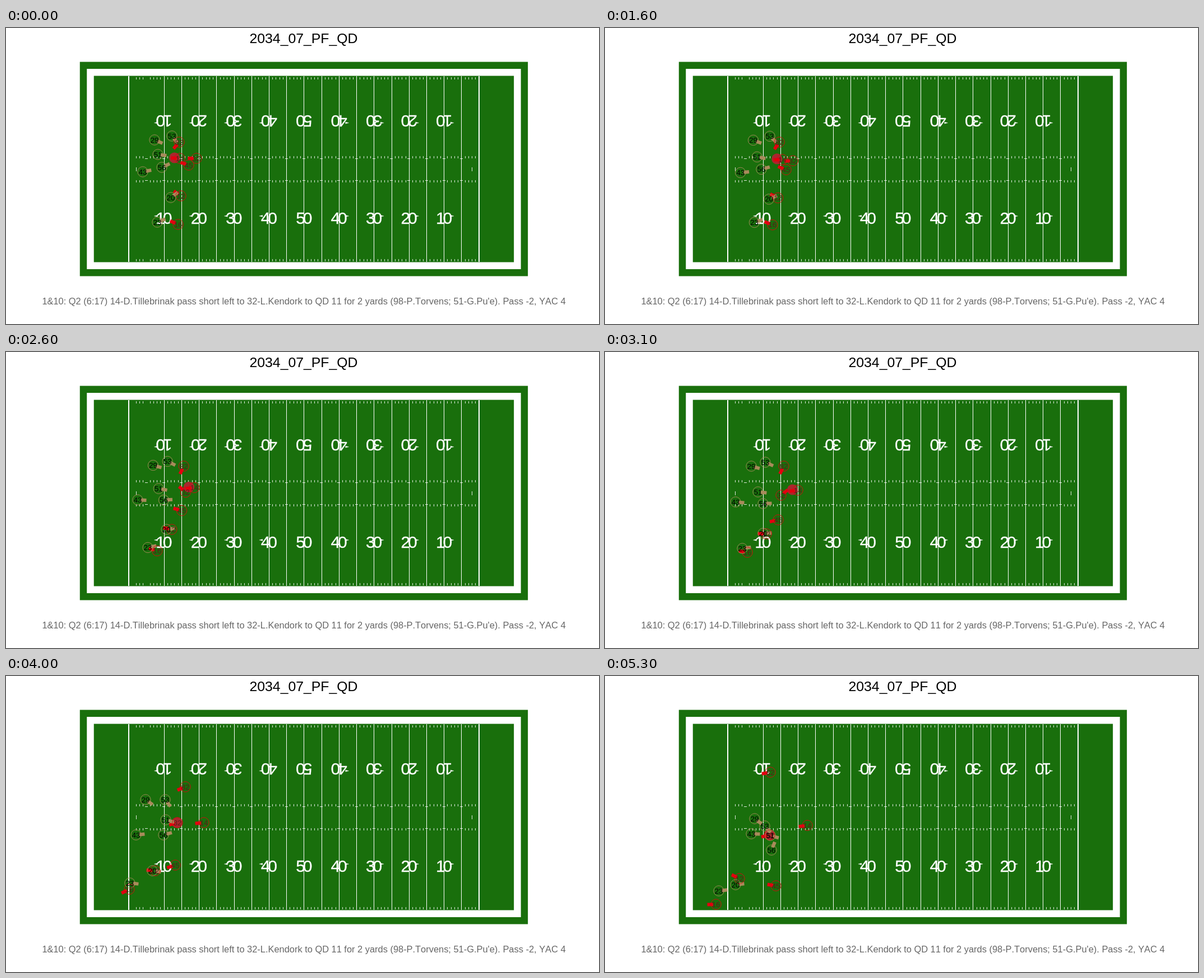
Recreate the animation shown at these times as an HTML page. Size 1058x529 px, loop 5.4 s.

```html
<!DOCTYPE html>
<html lang="en">
<head>
<meta charset="utf-8">
<title>Play animation</title>
<style>
  html, body { margin: 0; width: 100%; height: 100%; overflow: hidden; background: #fff; }
  svg { display: block; width: 100%; height: 100%; }
  text { font-family: "Liberation Sans", Arial, sans-serif; text-anchor: middle; font-kerning: none; }
</style>
</head>
<body>
<svg id="stage" viewBox="0 0 1058 529"></svg>
<script>
const LOOP = 5400, STEP = 100;
const SNAP = 900, THROW = 3500, CATCH = 3900;
const GRASS = '#196f0c', GOLD = '#a98b5b', RED = '#e3000f', BALL = '#a9272d';
const YARD = 6.245, GOAL = 219.2, MID_Y = 252, HALF_WIDTH = 166.5;
const stage = document.getElementById('stage');

function add(parent, tag, attrs, text) {
  const el = document.createElementNS('http://www.w3.org/2000/svg', tag);
  for (const k in attrs) el.setAttribute(k, attrs[k]);
  if (text !== undefined) el.textContent = text;
  parent.appendChild(el);
  return el;
}
const group = (attrs = {}) => add(stage, 'g', attrs);
const yardX = yards => GOAL + yards * YARD;

// Grass apron, white border and playing surface, two yards apart
function drawTurf() {
  [4, 2, 0].forEach((pad, i) => add(stage, 'rect', {
    x: yardX(-10 - pad), y: MID_Y - HALF_WIDTH - pad * YARD,
    width: (120 + 2 * pad) * YARD, height: 2 * (HALF_WIDTH + pad * YARD),
    fill: i === 1 ? '#fff' : GRASS
  }));
}

function drawLines() {
  const chalk = group({ stroke: '#fff', fill: 'none', 'shape-rendering': 'crispEdges' });
  const vertical = (x, top, bottom) => `M${Math.round(x) + 0.5} ${top}V${bottom}`;
  let lines = '', ticks = '';
  for (let y = 2; y < 100; y++) {
    const x = yardX(y);
    if (y % 5) {
      for (const top of [88, 229, 272, 413]) ticks += vertical(x, top, top + 4);
    } else {
      if (y > 5) lines += vertical(x, 86, 418);
      for (const row of [233.5, 272.5]) ticks += `M${x - 2.5} ${row}h5`;
    }
  }
  for (const y of [2, 98]) ticks += vertical(yardX(y), 249, 256);
  add(chalk, 'path', { d: lines });
  add(chalk, 'path', { d: ticks, 'stroke-opacity': 0.85 });
  for (const y of [0, 100])
    add(chalk, 'path', { d: `M${Math.round(yardX(y))} 86V418`, 'stroke-width': 2 });
}

function drawNumerals() {
  const marks = group({ fill: '#fff', stroke: '#fff', 'stroke-width': 0.3, 'font-size': 30 });
  for (let y = 10; y <= 90; y += 10) {
    const x = yardX(y) + 0.3, label = String(Math.min(y, 100 - y));
    for (const [cy, turn] of [[339.5, 0], [166.5, 180]]) {
      const pair = add(marks, 'g', { transform: `translate(${x} ${cy}) rotate(${turn})` });
      [...label].forEach((digit, i) => add(pair, 'text', { x: (i * 2 - 1) * YARD, y: 10.8 }, digit));
      if (y === 50) continue;
      const side = y < 50 ? -1 : 1, ay = cy > MID_Y ? 336 : 169.5;
      add(marks, 'path', { d: `M${x + side * 17.5} ${ay}l${-side * 6} -1.6v3.2z` });
    }
  }
}

// Rest until the snap, then a monotone cubic through four values
const KEYS = [SNAP, 3100, 4000, 5300];
function curve(values) {
  const slope = i => (values[i + 1] - values[i]) / (KEYS[i + 1] - KEYS[i]);
  const tangent = i => {
    if (i === 0) return 0;
    if (i === 3) return slope(2);
    const a = slope(i - 1), b = slope(i);
    return a * b > 0 ? 2 * a * b / (a + b) : 0;
  };
  return time => {
    const t = Math.min(Math.max(time, SNAP), KEYS[3]);
    const i = t < KEYS[1] ? 0 : t < KEYS[2] ? 1 : 2;
    const h = KEYS[i + 1] - KEYS[i], u = (t - KEYS[i]) / h, v = 1 - u;
    return values[i] * (1 + 2 * u) * v * v + tangent(i) * h * u * v * v
      + values[i + 1] * u * u * (3 - 2 * u) - tangent(i + 1) * h * u * u * v;
  };
}

drawTurf();
drawLines();
drawNumerals();
const ball = add(stage, 'circle', { r: 9.6, fill: BALL });
const bars = group(), rings = group(), numbers = group();
const players = [];

// A player runs through the given points; a bar shows where he faces
function player(number, color, ...route) {
  const p = {
    ahead: color === RED ? -1 : 1,
    x: curve(route.map(at => at[0])),
    y: curve(route.map(at => at[1])),
    bar: add(bars, 'rect', { x: 5, y: -3, width: 10.5, height: 6, fill: color }),
    ring: add(rings, 'circle', { r: 9.2, fill: 'none', stroke: color, 'stroke-width': 0.9 }),
    label: add(numbers, 'text', { y: 4.6, 'font-size': 13, fill: color === RED ? '#5a1d18' : '#000' }, number)
  };
  players.push(p);
  return p;
}

player(82, RED, [309, 204], [319, 204], [320, 198], [295, 172]);
const passer = player(14, RED, [310, 233], [344, 247], [353, 262], [361, 267]);
const catcher = player(32, RED, [340, 233], [314, 256], [306, 262], [294, 284]);
player(45, RED, [326, 245], [309, 300], [302, 338], [305, 375]);
player(12, RED, [312, 300], [288, 325], [266, 348], [240, 362]);
player(16, RED, [307, 351], [254, 358], [220, 381], [198, 408]);
player(53, GOLD, [296, 193], [286, 197], [284, 221], [285, 268]);
player(29, GOLD, [265, 200], [261, 204], [249, 221], [267, 255]);
player(51, GOLD, [271, 226], [273, 250], [285, 257], [295, 285]);
player(56, GOLD, [278, 249], [282, 271], [281, 284], [297, 311]);
player(43, GOLD, [244, 257], [233, 268], [232, 284], [261, 282]);
player(20, GOLD, [294, 303], [282, 324], [261, 348], [233, 373]);
player(23, GOLD, [270, 347], [245, 351], [221, 370], [203, 384]);

// Held by the passer, thrown, then carried by the catcher
function ballAt(t) {
  const u = Math.min(Math.max((t - THROW) / (CATCH - THROW), 0), 1);
  const mix = (a, b) => a + (b - a) * u;
  return [mix(passer.x(t) - 9.5, catcher.x(t) - 1), mix(passer.y(t) - 1, catcher.y(t))];
}

// Players look downfield, lean with their run and turn to a near ball
function facing(p, x, y, t, bx, by) {
  const run = (p.y(t + 50) - p.y(t - 50)) * 0.3;
  const pull = 55 / Math.max(Math.hypot(bx - x, by - y), 25) ** 2;
  return Math.atan2(run + pull * (by - y), p.ahead + pull * (bx - x)) * 180 / Math.PI;
}

function render(ms) {
  const t = Math.floor((ms % LOOP) / STEP) * STEP;
  const [bx, by] = ballAt(t);
  ball.setAttribute('cx', bx);
  ball.setAttribute('cy', by);
  for (const p of players) {
    const x = p.x(t), y = p.y(t), at = `translate(${x} ${y})`;
    p.ring.setAttribute('transform', at);
    p.label.setAttribute('transform', at);
    p.bar.setAttribute('transform', `${at} rotate(${facing(p, x, y, t, bx, by)})`);
  }
}

add(stage, 'text', { x: 531, y: 26.5, 'font-size': 24.8 }, '2034_07_PF_QD');
add(stage, 'text', { x: 531.5, y: 494, 'font-size': 16.42, fill: '#666' },
  "1&10: Q2 (6:17) 14-D.Tillebrinak pass short left to 32-L.Kendork to QD 11 for 2 yards (98-P.Torvens; 51-G.Pu'e). Pass -2, YAC 4");

let start;
function tick(now) {
  if (start === undefined) start = now;
  render(now - start);
  requestAnimationFrame(tick);
}
render(0);
requestAnimationFrame(tick);
</script>
</body>
</html>
```
